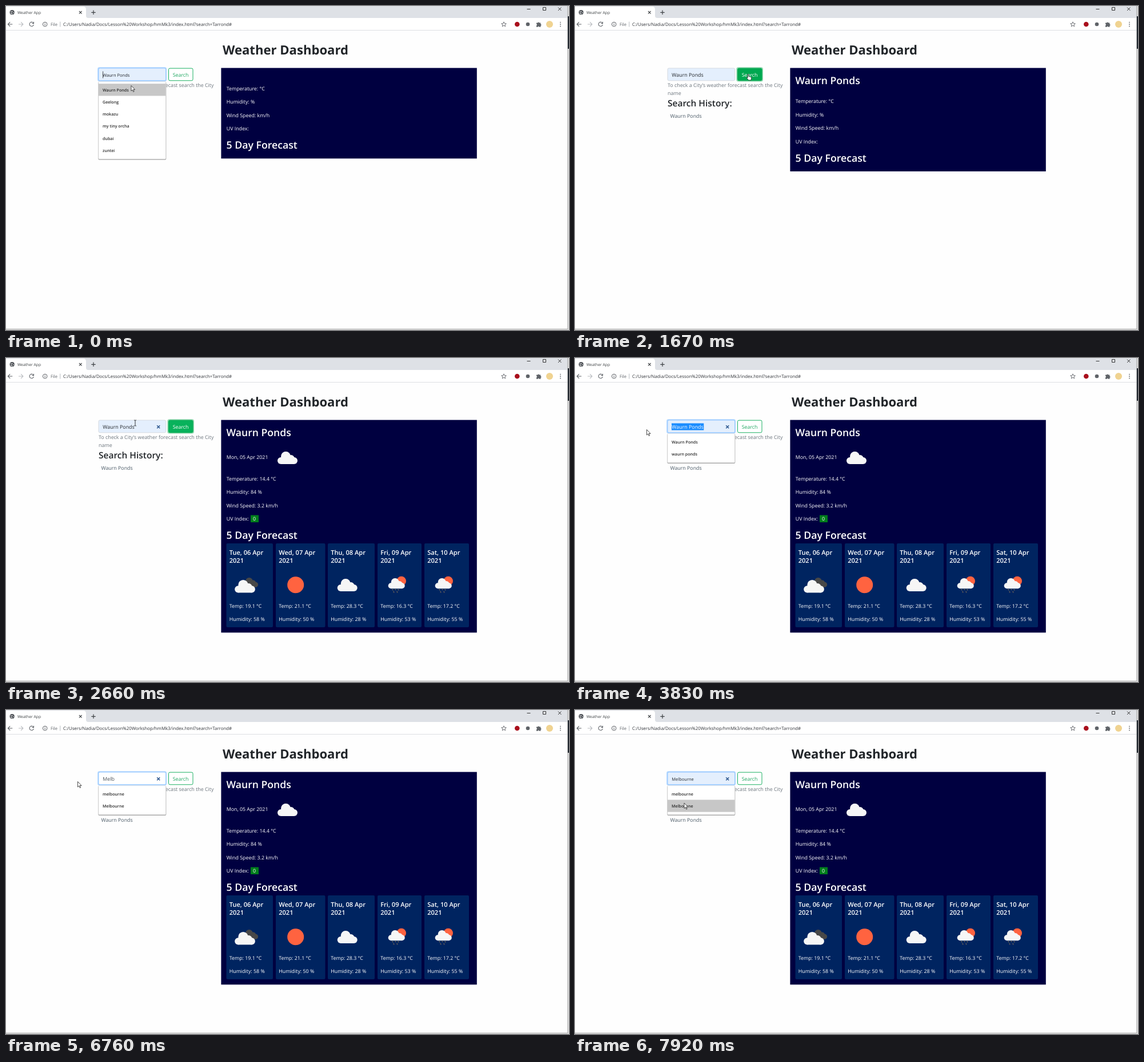
An HTML page for the animation above (8 s loop, 985 by 568 pixels).

```html
<!DOCTYPE html>
<html lang="en">
<head>
<meta charset="utf-8">
<title>Weather App</title>
<style>
  html, body { margin: 0; width: 100%; height: 100%; overflow: hidden; background: #fefefe; }
  svg { display: block; }
  text { font-family: "Open Sans", "Noto Sans", sans-serif; white-space: pre; text-rendering: geometricPrecision; }
</style>
</head>
<body>
<svg id="stage" width="985" height="568" viewBox="0 0 985 568"></svg>
<script>
const NAVY = '#000040', CARD = '#002460', GREEN = '#00a850', INK = '#212529', GREY = '#5f6368';
const PLACE = 'Waurn Ponds';

// y is the middle of the capital letters
const text = (x, y, s, size = 8.85, fill = '#fff', weight = 500) =>
  `<text x="${x}" y="${y + size * 0.357}" font-size="${size}" fill="${fill}" font-weight="${weight}">${s}</text>`;
const rect = (x, y, w, h, fill, more = '') =>
  `<rect x="${x}" y="${y}" width="${w}" height="${h}" fill="${fill}" ${more}/>`;
const circle = (x, y, r, fill, more = '') =>
  `<circle cx="${x}" cy="${y}" r="${r}" fill="${fill}" ${more}/>`;
const line = (d, stroke = GREY, width = 1.1) =>
  `<path d="${d}" fill="none" stroke="${stroke}" stroke-width="${width}"/>`;
const clip = (x, y, w, h, body) =>
  `<svg x="${x}" y="${y}" width="${w}" height="${h}" viewBox="${x} ${y} ${w} ${h}">${body}</svg>`;

const cloud = (x, y, scale = 1, fill = '#f6f6f6') =>
  `<g transform="translate(${x} ${y}) scale(${scale})">` +
  circle(6, 16, 6, fill) + circle(14.5, 8.5, 8.5, fill) + circle(23.5, 12.5, 6.5, fill) +
  circle(29, 16, 6, fill) + rect(6, 10, 23, 12, fill) + '</g>';

const showers = x =>
  circle(x + 23, 391, 8.3, '#ff6340') + cloud(x, 386, 0.83) +
  [[7, 405], [12, 404.5], [17, 405], [9, 409], [15, 409]]
    .map(([dx, y]) => line(`M${x + dx} ${y}l1.4 2.4`, '#5c5a5a', 1.6)).join('');

const icons = {
  broken: x => cloud(x + 20, 385, 0.77, '#484848') + cloud(x + 6, 389, 1.02),
  sun: x => circle(x + 26, 397.7, 14.5, '#ff6340'),
  cloudy: x => cloud(x + 8, 387),
  rain: x => showers(x + 10)
};

const days = [
  [385.5, 81.5, 'Tue, 06 Apr', 'broken', '19.1', 58],
  [472, 86.5, 'Wed, 07 Apr', 'sun', '21.1', 50],
  [563, 82, 'Thu, 08 Apr', 'cloudy', '28.3', 28],
  [650, 77, 'Fri, 09 Apr', 'rain', '16.3', 53],
  [732, 78, 'Sat, 10 Apr', 'rain', '17.2', 55]
];

function dayCard([x, w, date, icon, temp, hum]) {
  const left = x + 5.2;
  return rect(x, 325, w, 147, CARD, 'rx="2"') +
    text(left, 341, date, 11.1, '#fff', 600) + text(left, 355, '2021', 11.1, '#fff', 600) +
    icons[icon](x + 8.7) +
    text(left, 434.5, `Temp: ${temp} °C`) + text(left, 458, `Humidity: ${hum} %`);
}

function browser() {
  return rect(0, 0, 983, 21, '#dee1e6') + rect(0, 21, 983, 21, '#fff') +
    '<path d="M0 1H135q5 0 5 5V17q0 4 4 4H0Z" fill="#fff"/>' +
    rect(0, 42, 983, 0.8, '#d5d8dc') +
    circle(10.7, 11.2, 4.1, '#4d5156') + line('M8 9.5l2.5 1 1.5-1.5M8 12.5l2.5.5.5 1.5M12.5 11.5l1.5.5', '#fff', 1) +
    text(20, 11.3, 'Weather App', 6.75, '#3c4043', 400) +
    line('M128 9l4.6 4.6M132.6 9l-4.6 4.6', '#3c4043', 1.1) +
    line('M149.3 11.3h7.4M153 7.6v7.4', '#3c4043', 1.2) +
    line('M911.5 5.5h6M939.5 2.5h5v5h-5zM966 2.5l5.5 5.5M971.5 2.5l-5.5 5.5', '#222', 0.9) +
    line('M11.3 32H3.5M7.2 28.2L3.4 32l3.8 3.8') +
    line('M22 32h7.8M26.1 28.2l3.8 3.8-3.8 3.8', '#b9bcc0') +
    line('M47.7 29.5A3.7 3.7 0 1 0 48.4 32.8M48.5 27.8v2.8h-2.8') +
    circle(68.2, 32, 3.8, 'none', `stroke="${GREY}"`) + line('M68.2 31.5v2.5M68.2 29.8v1') +
    text(78, 32, 'File', 7.6, GREY, 400) + rect(94.5, 27.5, 0.7, 9, '#9aa0a6') +
    text(100, 32, 'C:/Users/Nadia/Docs/Lesson%20Workshop/hmMk3/index.html?search=Tarrond#', 7.85, '#303338', 400) +
    line('M871 27.8l1.2 2.9 3.1.2-2.4 2 .8 3-2.7-1.7-2.7 1.7.8-3-2.4-2 3.1-.2z', GREY, 0.9) +
    circle(894.3, 32, 4.3, '#a90f1c') + circle(913, 32, 3.3, GREY) +
    '<path d="M928 29.5h2.3a1.5 1.5 0 0 1 2.9 0h2.2v2.3a1.5 1.5 0 0 1 0 2.9v2h-2.3a1.4 1.4 0 0 0-2.7 0H928v-2.5a1.4 1.4 0 0 0 0-2.7z" fill="#5f6368"/>' +
    circle(951, 32, 6, '#f0d391') +
    [28.6, 32, 35.4].map(y => circle(970, y, 0.9, GREY)).join('') +
    rect(982.3, 0, 1, 567, '#9c9c9c') + rect(983.3, 0, 1.7, 568, '#d9d9d9') +
    rect(983, 18, 2, 57, '#20262e') + rect(0, 566, 983, 1, '#8f8f8f');
}

function page() {
  return text(379, 77.3, 'Weather Dashboard', 22.1, INK, 700) +
    text(162, 138.8, 'To check a City’s weather forecast search the City', 8.9, '#6c757d', 400) +
    text(162, 153, 'name', 8.9, '#6c757d', 400);
}

function panel(stage) {
  const shift = [0, 22.5, 67][stage];
  const lines = ['Temperature: ', 'Humidity: ', 'Wind Speed: ', 'UV Index:'];
  const values = stage === 2 ? ['14.4 ', '84 ', '3.2 ', ''] : ['', '', '', ''];
  const units = ['°C', '%', 'km/h', ''];
  let out = rect(376.4, 108.6, 447.4, [158.8, 181.3, 372.8][stage], NAVY);
  if (stage) out += text(385.5, 131, PLACE, 17.6, '#fff', 600);
  lines.forEach((s, i) => out += text(385.7, 144.7 + shift + i * 23.5, s + values[i] + units[i]));
  out += text(385.5, 243.7 + shift, '5 Day Forecast', 17.7, '#fff', 600);
  if (stage === 2) {
    out += text(385.7, 174, 'Mon, 05 Apr 2021') + cloud(475, 164) +
      rect(428, 275.5, 14, 12.5, '#007d1c') + text(432, 282, '0') +
      days.map(dayCard).join('');
  }
  return out;
}

function field(s) {
  const y = 120.9, size = s.preview ? 7.5 : 8.85, ink = s.auto ? '#22262a' : '#495057';
  let out = s.focus ? rect(160.2, 107.2, 120.8, 25, '#b5d8ff', 'rx="3"') : '';
  out += rect(162, 109, 117.7, 21.8, s.auto ? '#e4effd' : '#fff',
    `rx="2.4" stroke="${s.focus ? '#80bdff' : '#ced4da'}" stroke-width=".8"`);
  out += text(169.3, y, s.value, size, ink, 400);
  if (s.select) {
    out += clip(s.select, 114.3, 225.3 - s.select, 12.4,
      rect(169, 114.3, 57, 12.4, '#1a8cff') + text(169.3, y, s.value, size, '#fff', 400));
  }
  if (s.caret) out += rect(s.caret, 114.5, 0.8, 12, '#222');
  if (s.clear) out += line('M264.2 118.3l5 5M269.2 118.3l-5 5', '#2b568f', 1.6);
  return out;
}

function button(s) {
  const ring = s.ring ? rect(282.3, 107.2, 46.7, 25.4, '#93d8b0', 'rx="3.5"') : '';
  return ring + rect(284.5, 109.2, 42.5, 21.6, s.fill, `rx="2.4" stroke="${GREEN}" stroke-width=".9"`) +
    text(291.7, 120.5, 'Search', 8.85, s.fill === '#fff' ? '#21a862' : '#fff', 400);
}

function list(s) {
  const bottom = 141.5 + 21.2 * s.items.length;
  const body = rect(161.3, 133, 119, bottom - 132, '#a8a8a8', 'rx="2"') +
    rect(161.8, 132.4, 117.8, bottom - 132.8, '#fff', 'rx="1.5" stroke="#d4d4d4" stroke-width=".6"') +
    s.items.map((item, i) =>
      (i === s.hover ? rect(162, 136.2 + 21.2 * i, 117.5, 21.3, '#c7c7c7') : '') +
      text(169, 147.2 + 21.2 * i, item, 7.1, '#2b2b2b', 600)).join('');
  return clip(160, 132, 122, s.cut ? 55 : 140, body);
}

const pointers = {
  arrow: '<path d="M0 0V9.5L2.2 7.5 3.7 11 5.2 10.4 3.7 7H6.6Z" fill="#fff" stroke="#222" stroke-width=".8"/>',
  beam: line('M-2-5h1.5l.5.5.5-.5H2M0-4.5v9M-2 5h1.5l.5-.5.5.5H2', '#222', 0.9),
  hand: '<path d="M1.2.7q1-.8 1.7.3V4.5l4 .9q1.100.4.9 1.6L7 11H2.5L-.8 6.8q.3-1.3 2 0Z" fill="#fff" stroke="#222" stroke-width=".8"/>'
};
const pointer = ([kind, x, y]) => `<g transform="translate(${x} ${y})">${pointers[kind]}</g>`;

const recent = [PLACE, 'Geelong', 'mokazu', 'my tiny orcha', 'dubai', 'zuntei'];
const places = [PLACE, 'waurn ponds'];
const startM = ['my tiny orcha', 'my tiny or', 'my tiny orch', 'melbourne', 'Melbourne', 'my tiny'];
const melb = ['melbourne', 'Melbourne'];
const first = { hover: 0, value: 'melbourne' }, second = { hover: 1, value: 'Melbourne' };

// Each entry changes part of the state from its time on.
const timeline = [
  [0, { value: PLACE, preview: true, auto: true, focus: true, caret: 169.3, items: recent, hover: 0,
        fill: '#fff', panel: 0, at: ['arrow', 219, 139.5] }],
  [120, { caret: 0, at: ['arrow', 218, 143] }],
  [400, { items: null, hover: -1, preview: false, clear: true, caret: 225.3, at: ['arrow', 221, 142] }],
  [520, { at: ['beam', 279.5, 125] }],
  [660, { fill: '#2fb86d', at: ['hand', 294, 119] }],
  [810, { fill: GREEN, caret: 0, at: ['hand', 299, 119] }],
  [930, { at: ['hand', 301, 119] }],
  [1210, { focus: false, clear: false, ring: true }],
  [1360, { history: true }],
  [1670, { panel: 1 }],
  [1820, { panel: 2 }],
  [2660, { fill: '#08b25b', clear: true, at: ['beam', 226, 114] }],
  [2780, { fill: '#fff', at: ['beam', 214, 119] }],
  [2900, { at: ['beam', 236, 121] }],
  [3050, { focus: true, ring: false, at: ['beam', 240, 121] }],
  [3170, { items: places }],
  [3320, { select: 197, at: ['beam', 197, 121] }],
  [3440, { select: 169, at: ['beam', 152, 123] }],
  [3560, { at: ['arrow', 126, 122] }],
  [3710, { at: ['arrow', 124, 124.5] }],
  [3830, { at: ['arrow', 125.5, 125.5] }],
  [5590, { value: 'M', auto: false, select: 0, caret: 177.7, items: startM, cut: true }],
  [5730, { cut: false }],
  [5850, { value: 'Me', caret: 182.7, items: melb }],
  [5970, { value: 'Mel', caret: 185 }],
  [6220, { value: 'Melb', caret: 190.4 }],
  [6760, { caret: 0 }],
  [6880, { at: ['arrow', 158, 138] }],
  [7000, { ...first, preview: true, auto: true, at: ['arrow', 203, 144] }],
  [7150, { at: ['arrow', 187, 148] }],
  [7290, { ...second, at: ['arrow', 188, 160] }],
  [7430, { at: ['arrow', 190, 163] }],
  [7550, { ...first, at: ['arrow', 191, 153] }],
  [7680, { at: ['arrow', 191, 151] }],
  [7800, { ...second, at: ['arrow', 191, 160] }],
  [7920, { at: ['arrow', 191, 163] }]
];

const stage = document.getElementById('stage');
const backdrop = rect(0, 0, 985, 568, '#fefefe') + browser() + page();
let shown = -1;

function draw(index) {
  const s = Object.assign({}, ...timeline.slice(0, index + 1).map(e => e[1]));
  stage.innerHTML = backdrop + panel(s.panel) +
    (s.history ? text(162, 170.5, 'Search History:', 15.5, INK, 600) + text(166.5, 193.3, PLACE, 8.8, '#495865', 400) : '') +
    button(s) + field(s) + (s.items ? list(s) : '') + pointer(s.at);
}

function tick() {
  const t = performance.now() % 8000;
  const index = timeline.filter(e => e[0] <= t).length - 1;
  if (index !== shown) draw(shown = index);
  requestAnimationFrame(tick);
}
tick();
</script>
</body>
</html>
```
